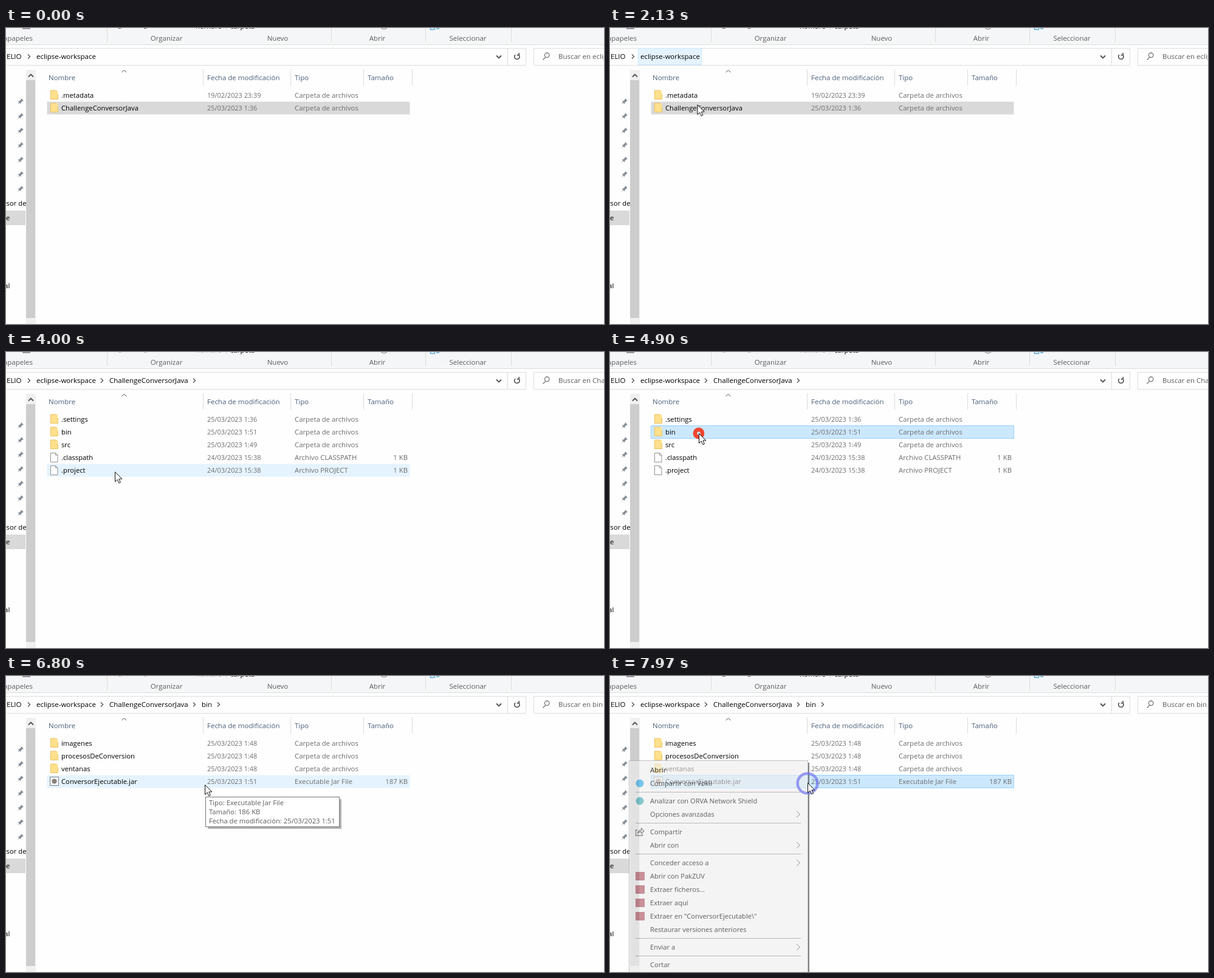
These frames come from a looping animation (984 px wide and 488 px high, 8 s). An HTML page:

```html
<!DOCTYPE html>
<html lang="es">
<head>
<meta charset="utf-8">
<title>Explorador</title>
<style>
html, body { margin: 0; width: 100%; height: 100%; overflow: hidden; background: #fefefe; }
svg { display: block; width: 984px; height: 488px; }
text { font: 11.5px "Open Sans", "Noto Sans", sans-serif; fill: #000; white-space: pre; }
.name, .tip text { font-size: 11.25px; }
.menu text { font-size: 11.1px; }
.dim { fill: #6d6d6d; font-size: 11.35px; }
.head { fill: #4c607a; }
.label { fill: #5c5c5c; }
.date { font-size: 10.9px; }
.line { fill: none; stroke: #dcdcdc; }
.icon { fill: none; stroke: #505050; stroke-width: 1.3; }
.soft { fill: #e5f3ff; }
.pick { fill: #cce8ff; stroke: #99d1ff; }
.step { animation: 8s step-end infinite; }
.flow { animation: 8s linear infinite; }

.s1 { animation-name: s1; }
.s2 { animation-name: s2; }
.s3 { animation-name: s3; }
.tail { animation-name: tail; }
.late { animation-name: late; }
.hover { animation-name: hover; }
.pick1 { animation-name: pick1; }
.pick2 { animation-name: pick2; }
.crumb1 { animation-name: crumb1; }
.crumb2 { animation-name: crumb2; }
.able { animation-name: able; }
.tip { animation-name: tip; }
.menu { animation-name: menu; }
.cursor { animation-name: cursor; }
.ring { fill: none; stroke: #f0432c; opacity: 0; animation-name: ring; }
.tap { animation-name: tap; }
.blue { stroke: #6c6cf0; }

@keyframes s1 { 0% { opacity: 1 } 40%, 100% { opacity: 0 } }
@keyframes s2 { 0% { opacity: 0 } 40% { opacity: 1 } 64.4%, 100% { opacity: 0 } }
@keyframes s3 { 0% { opacity: 0 } 64.4%, 100% { opacity: 1 } }
@keyframes tail { 0% { opacity: 0 } 44%, 100% { opacity: 1 } }
@keyframes late { 0% { opacity: 0 } 95.4%, 100% { opacity: 1 } }
@keyframes able { 0% { fill: #161616 } 43.8% { fill: #a4a4a4 } 95.6%, 100% { fill: #161616 } }
@keyframes hover {
  0% { opacity: 0; transform: none }
  40% { opacity: 1; transform: none }
  44.5% { opacity: 1; transform: translateY(21px) }
  45.6% { opacity: 1; transform: translateY(42px) }
  46.8% { opacity: 1; transform: translateY(63px) }
  52.4% { opacity: 1; transform: translateY(42px) }
  53.6% { opacity: 1; transform: translateY(21px) }
  54.8% { opacity: 1; transform: none }
  70.2% { opacity: 1; transform: translateY(21px) }
  70.6%, 100% { opacity: 1; transform: translateY(42px) }
}
@keyframes pick1 { 0%, 28.7% { opacity: 0 } 31.6%, 40% { opacity: 1 } 40.01%, 100% { opacity: 0 } }
@keyframes pick2 { 0%, 59.3% { opacity: 0 } 60.4%, 64.39% { opacity: 1 } 64.4%, 100% { opacity: 0 } }
@keyframes crumb1 { 0%, 10.6% { opacity: 0 } 12.9%, 15.8% { opacity: 1 } 18.5%, 100% { opacity: 0 } }
@keyframes crumb2 { 0%, 16.5% { opacity: 0 } 19%, 26.7% { opacity: 1 } 29.5%, 100% { opacity: 0 } }
@keyframes tip { 0%, 80.3% { opacity: 0 } 82.5%, 85.2% { opacity: 1 } 90%, 100% { opacity: 0 } }
@keyframes menu { 0%, 98.3% { opacity: 0 } 99.6% { opacity: .62 } 100% { opacity: .75 } }
@keyframes ring {
  0% { r: 5.5px; stroke-width: 7px; opacity: 1 }
  2.1% { r: 11px; stroke-width: 4px; opacity: .85 }
  4.2% { r: 16.5px; stroke-width: 4.5px; opacity: .65 }
  5.6%, 100% { r: 20px; stroke-width: 4px; opacity: 0 }
}
@keyframes tap {
  0% { r: 5.5px; stroke-width: 7px; opacity: 1 }
  1.85% { r: 10px; stroke-width: 4px; opacity: .85 }
  1.9%, 100% { r: 10px; stroke-width: 4px; opacity: 0 }
}
@keyframes cursor {
  0%, .4% { transform: translate(862px, -22px) }
  3.75% { transform: translate(640px, 60px) }
  6.25% { transform: translate(380px, 112px) }
  8.1% { transform: translate(170px, 95px) }
  10.4%, 15.4% { transform: translate(24px, 45px) }
  20.4%, 23.75% { transform: translate(118px, 50px) }
  26.6% { transform: translate(143px, 126px) }
  28.75% { transform: translate(165px, 136px) }
  31.6%, 34.6% { transform: translate(178px, 131px) }
  35.4%, 43.1% { transform: translate(171px, 128px) }
  47.9%, 48.4% { transform: translate(188px, 195px) }
  51.25% { transform: translate(172px, 199px) }
  55.4%, 69.6% { transform: translate(146px, 134px) }
  70.9% { transform: translate(261px, 170px) }
  72.5% { transform: translate(318px, 183px) }
  74.6%, 77.1% { transform: translate(335px, 179px) }
  78.4%, 85% { transform: translate(327px, 179px) }
  90%, 100% { transform: translate(325px, 176px) }
}
</style>
</head>
<body>
<svg id="stage" viewBox="0 0 984 488" xmlns="http://www.w3.org/2000/svg"></svg>
<script>
// y is the middle of the text line
const text = (x, y, s, cls = '', anchor = 'start') =>
  `<text x="${x}" y="${y + 4}" class="${cls}" text-anchor="${anchor}">${s}</text>`;
const rect = (x, y, w, h, attrs) =>
  `<rect x="${x}" y="${y}" width="${w}" height="${h}" ${attrs}/>`;
const path = (d, cls = 'icon', attrs = '') => `<path d="${d}" class="${cls}" ${attrs}/>`;
const group = (cls, ...parts) => `<g class="${cls}">${parts.join('')}</g>`;
const chevron = x => path(`M${x - 2} 43.5l3.5 3.5-3.5 3.5`);

const icons = {
  folder: y => rect(73, y - 8, 12, 15, 'fill="#ffe08c"') +
    path(`M73.5 ${y + 6.5}h12v-9M73.5 ${y + 6}v-14h9`, 'line', 'style="stroke:#e8c160"'),
  file: y => path(`M73.5 ${y - 7.5}h8l3.5 3.5v11.5h-11.5zM81.5 ${y - 7.5}v3.5h3.5`, 'icon',
    'style="fill:#fff;stroke:#909090;stroke-width:1"'),
  jar: y => rect(72.5, y - 7.5, 14, 14, 'fill="#f6f6f6" stroke="#7c8794"') +
    `<circle cx="79.5" cy="${y - .5}" r="4" fill="#8a8078"/>`
};

const row = (i, icon, name, date, type, size = '') => {
  const y = 111 + 21 * i;
  return icons[icon](y) + text(91, y, name, 'name') + text(331, y, date, 'dim date') +
    text(475, y, type, 'dim') + text(661, y, size, 'dim', 'end');
};
const dir = (i, name, date) => row(i, 'folder', name, date, 'Carpeta de archivos');
const search = s => text(909, 47, 'Buscar en ' + s, 'label');

const ribbon = () => rect(0, 0, 984, 27, 'fill="#f5f6f7"') +
  path('M0 27.5H984M166.5 0v23M362.5 0v4M535.5 0v23M690.5 0v23M831.5 0v23', 'line') +
  text(44, 17, 'Portapapeles', 'label', 'end') +
  [['Organizar', 264], ['Nuevo', 447], ['Abrir', 611], ['Seleccionar', 760]]
    .map(([s, x]) => text(x, 17, s, 'label', 'middle')).join('') +
  rect(27, 0, 13, 2, 'fill="#9a9aa0"') +
  text(184, -3, 'a', 'step able') + text(226, -3, 'a', 'step able') +
  text(312, -3, 'nombre', 'step able') + text(369, -3, 'carpeta') +
  path('M617 0q5 4 10 0', 'icon', 'style="stroke:#999"') +
  path('M698.5 0v2.5h7V0M709 0v1h4', 'icon', 'style="stroke:#58a8dc"');

const address = () =>
  path('M0 33.5H855.5V61.5H0M825.5 33.5v28M984 33.5H868.5V61.5H984', 'line') +
  group('flow crumb1', rect(-1, 33.5, 46.5, 27, 'class="soft" stroke="#cce8ff"')) +
  group('flow crumb2', rect(46.5, 33.5, 104, 27, 'class="soft" stroke="#cce8ff"')) +
  text(1, 47, 'ELIO') + chevron(38) + text(50, 47, 'eclipse-workspace') +
  path('M807 45.5l4 4 4-4', 'icon', 'style="stroke-width:1.8"') +
  path('M838 44.2a4.2 4.2 0 1 0 5.5-.2M844.2 41v3.6h-3.6', 'icon', 'style="stroke-width:1.6"') +
  path('M887.5 48.5l-4 4M894 44.8a3.8 3.8 0 1 1-7.6 0a3.8 3.8 0 1 1 7.6 0', 'icon', 'style="stroke:#777"');

const pin = (_, i) => path('M4 -5l4 4-2 .5-2.5 2.5-.3 2.5-2-2-3.7 3 3-3.7-2-2 2.5-.3L3.5-3z', '',
  `transform="translate(21 ${121 + 24 * i})" fill="#848c94"`);

const sidebar = () => Array.from({ length: 7 }, pin).join('') +
  rect(0, 301, 32, 24, 'fill="#d9d9d9"') +
  '<svg width="33" height="488">' + text(-4, 289, 'rsor de', 'name') + '</svg>' +
  text(0, 313, 'e') + text(-3, 425, 'al') +
  rect(33, 69, 16, 419, 'fill="#f0f0f0"') + rect(33, 86, 15, 392, 'fill="#cdcdcd"') +
  path('M37 80.5l4-4 4 4', 'icon', 'style="stroke-width:1.8"');

const header = () => path('M324.5 68v27M468.5 68v27M588.5 68v27M668.5 68v27', 'line') +
  path('M190.5 73l4-3.5 4 3.5', 'icon', 'style="stroke-width:1"') +
  [['Nombre', 70], ['Fecha de modificación', 331], ['Tipo', 475], ['Tamaño', 595]]
    .map(([s, x]) => text(x, 82, s, 'head')).join('');

const bar = (y, attrs) => rect(67.5, y + .5, 597, 21, attrs);

const lists = () =>
  group('step s1', bar(121, 'fill="#d9d9d9"')) +
  bar(121, 'class="soft step hover"') +
  bar(121, 'class="pick flow pick1"') + bar(121, 'class="pick flow pick2"') +
  bar(163, 'class="pick step late"') +
  group('step s1',
    dir(0, '.metadata', '19/02/2023 23:39'),
    dir(1, 'ChallengeConversorJava', '25/03/2023 1:36'),
    search('eclipse-workspace')) +
  group('step s2',
    dir(0, '.settings', '25/03/2023 1:36'),
    dir(1, 'bin', '25/03/2023 1:51'),
    dir(2, 'src', '25/03/2023 1:49'),
    row(3, 'file', '.classpath', '24/03/2023 15:38', 'Archivo CLASSPATH', '1 KB'),
    row(4, 'file', '.project', '24/03/2023 15:38', 'Archivo PROJECT', '1 KB'),
    chevron(158), text(170, 47, 'ChallengeConversorJava'),
    group('step tail', chevron(310)),
    search('ChallengeConversorJava')) +
  group('step s3',
    dir(0, 'imagenes', '25/03/2023 1:48'),
    dir(1, 'procesosDeConversion', '25/03/2023 1:48'),
    dir(2, 'ventanas', '25/03/2023 1:48'),
    row(3, 'jar', 'ConversorEjecutable.jar', '25/03/2023 1:51', 'Executable Jar File', '187 KB'),
    chevron(158), text(170, 47, 'ChallengeConversorJava'), chevron(310),
    text(322, 47, 'bin'), chevron(350), search('bin'));

const tooltip = () => group('flow tip',
  rect(332, 203, 220, 49, 'fill="#808080" opacity=".6"'),
  rect(328.5, 199.5, 220, 49, 'fill="#fff" stroke="#767676"'),
  ...['Tipo: Executable Jar File', 'Tamaño: 186 KB', 'Fecha de modificación: 25/03/2023 1:51']
    .map((s, i) => text(334, 209 + 15 * i, s, 'label')));

// label, middle line, icon, has submenu
const items = [
  ['Abrir', 155], ['Compartir con Vokli', 177, 'sky'],
  ['Analizar con ORVA Network Shield', 206, 'teal'], ['Opciones avanzadas', 228, '', 1],
  ['Compartir', 257, 'share'], ['Abrir con', 279, '', 1],
  ['Conceder acceso a', 308, '', 1], ['Abrir con PakZUV', 330, 'box'],
  ['Extraer ficheros...', 352, 'box'], ['Extraer aquí', 374, 'box'],
  ['Extraer en "ConversorEjecutable\\"', 396, 'box'], ['Restaurar versiones anteriores', 418],
  ['Enviar a', 447, '', 1], ['Cortar', 476]
];
const dot = fill => y => `<circle cx="49" cy="${y}" r="6.5" fill="${fill}"/>`;
const marks = {
  sky: dot('#2aa5e4'),
  teal: dot('#3aa6ae'),
  box: y => rect(42, y - 7, 15, 14, 'fill="#a8505e"'),
  share: y => path(`M45 ${y - 3}h-2.5v9h11v-3M45.5 ${y + 3}q1-6 6-6v-3l4.5 4.5-4.5 4v-3q-4 0-6 3.5z`)
};
const item = ([s, y, mark, sub], i) =>
  (mark ? marks[mark](y) : '') +
  (sub ? path(`M307 ${y - 5}l5.5 5-5.5 5`, 'icon', 'style="stroke-width:1"') : '') +
  `<text x="66" y="${y + 4}"${i ? '' : ' style="font-weight:600"'}>${s}</text>`;

const menu = () => group('flow menu',
  rect(325, 143, 3, 345, 'fill="#3c3c3c"'),
  rect(31.5, 139.5, 294, 360, 'fill="#eee" stroke="#a0a0a0"'),
  ...[191, 242, 293, 432, 461].map(y => path(`M42 ${y}.5H314`, 'line', 'style="stroke:#919191"')),
  ...items.map(item));

const ring = (x, y, start, cls = '') =>
  `<circle cx="${x}" cy="${y}" class="ring flow ${cls}" style="animation-delay:${start - 8000}ms"/>`;

const clicks = () =>
  ring(172, 129, 3030, 'tap') + ring(172, 129, 3200) +
  ring(146, 134, 4730, 'tap') + ring(146, 134, 4885) +
  group('step late', ring(325, 177, 7640, 'blue'));

const cursor = () => path('M.5 .5V16.5L4.2 13l2.6 5.8 2.6-1.2L6.9 12H12z', 'flow cursor',
  'fill="#fff" stroke="#111" stroke-width="1"');

document.getElementById('stage').innerHTML = [
  ribbon, address, sidebar, header, lists, tooltip, menu, clicks, cursor
].map(draw => draw()).join('');
</script>
</body>
</html>
```
